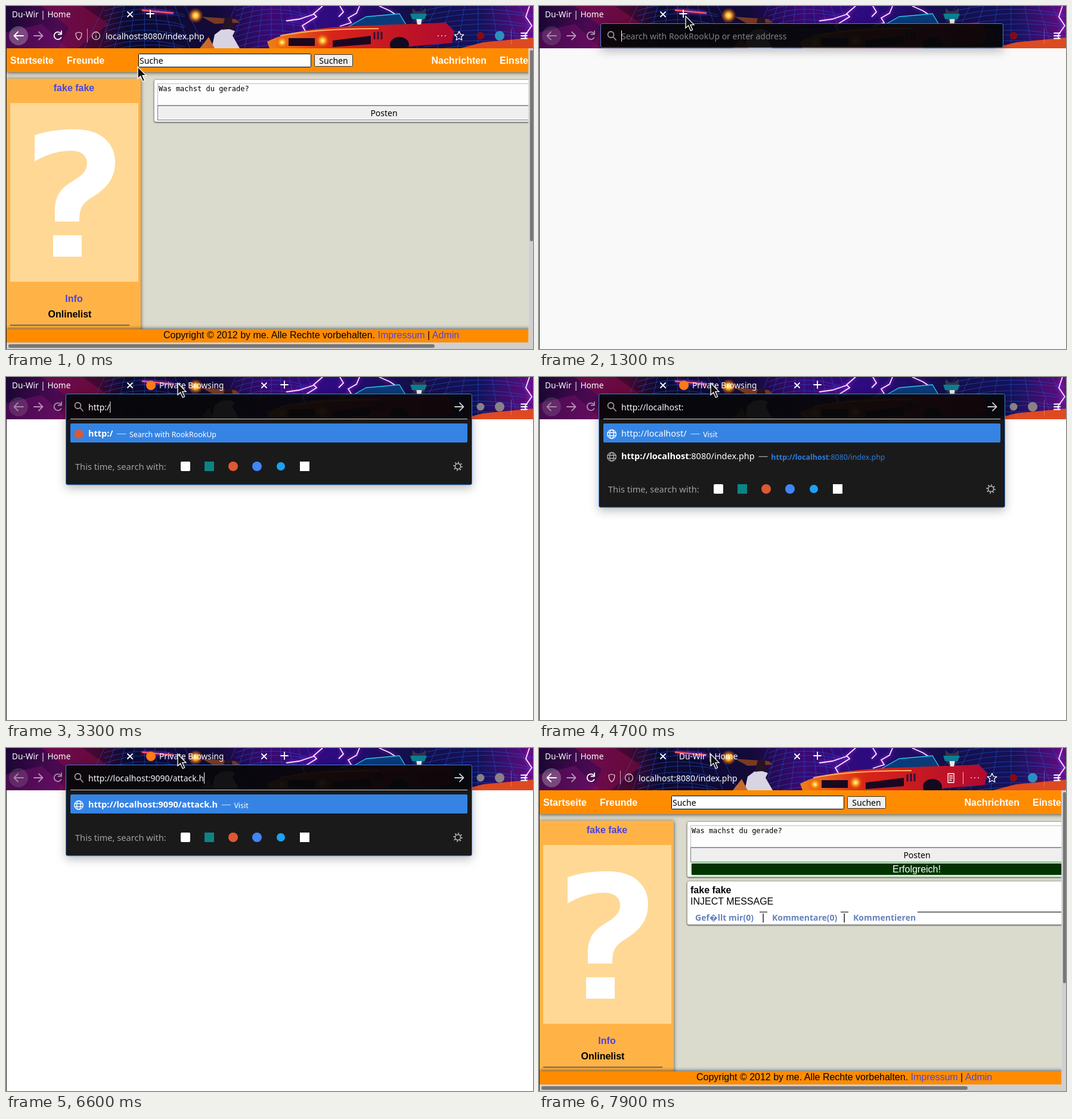
Animation, 884 px wide and 576 px high, one loop 8000 ms. Source, as an HTML page:

```html
<!DOCTYPE html>
<html lang="de">
<head>
<meta charset="utf-8">
<title>Browser demo</title>
<style>
html, body { margin: 0; width: 100%; height: 100%; overflow: hidden; background: #fff; }
svg { display: block; width: 100vw; height: 100vh; }
text { font: 14px "Noto Sans", "Open Sans", sans-serif; }
.site { font: 16px "Liberation Sans", Arial, sans-serif; }
.b { font-weight: 700; }
.mono { font: 12px "DejaVu Sans Mono", monospace; }
.tab { font-size: 13.7px; fill: #fbfbfe; }
.row { font-size: 14.5px; fill: #fff; }
.dash { font-size: 16.5px; font-weight: 400; opacity: .6; }
.sub { font-size: 12.4px; font-weight: 400; }
.link { fill: #4b44e0; }
.act { fill: #6482bd; font-weight: 700; }
.mid { text-anchor: middle; }
.line { fill: none; stroke: #fff; stroke-width: 1.8; stroke-linecap: round; stroke-linejoin: round; }
.thin { stroke-width: 1.3; }
.shade { filter: drop-shadow(0 1px 3px rgba(0,0,0,.65)); }
.card { fill: #fff; stroke: #aaa; filter: drop-shadow(0 1px 1px rgba(0,0,0,.6)); }
.field { fill: #fdfdfd; stroke: #bbb; }
.btn { fill: #efefef; stroke: #777; }
.glow { filter: drop-shadow(0 0 3px #d028ff); }
#box { stroke: #3584e4; filter: drop-shadow(0 5px 8px rgba(0,0,0,.28)); }
</style>
</head>
<body>
<svg viewBox="0 0 884 576" preserveAspectRatio="none">
<defs>
  <linearGradient id="sky">
    <stop offset="0" stop-color="#1b0634"/><stop offset=".1" stop-color="#4c0a52"/>
    <stop offset=".17" stop-color="#43082f"/><stop offset=".23" stop-color="#0b0a30"/>
    <stop offset=".4" stop-color="#130a38"/><stop offset=".5" stop-color="#3b0a72"/>
    <stop offset=".62" stop-color="#2c0b80"/><stop offset=".77" stop-color="#130f48"/>
    <stop offset=".9" stop-color="#15125a"/><stop offset="1" stop-color="#650c80"/>
  </linearGradient>
  <linearGradient id="paint">
    <stop offset="0" stop-color="#f08018"/><stop offset=".35" stop-color="#d82418"/>
    <stop offset="1" stop-color="#b00a30"/>
  </linearGradient>
  <radialGradient id="flash">
    <stop offset="0" stop-color="#fffbd0"/><stop offset=".35" stop-color="#ffb020"/>
    <stop offset="1" stop-color="#e04000" stop-opacity="0"/>
  </radialGradient>
  <clipPath id="strip"><rect width="884" height="71"/></clipPath>
  <clipPath id="view"><rect y="71" width="876.5" height="494"/></clipPath>
  <g id="globe" class="line thin">
    <circle r="7.3"/><ellipse rx="3.4" ry="7.3"/><path d="M-7 -2.5H7M-7 2.5H7"/>
  </g>
</defs>

<rect id="blank" y="71" width="884" height="505"/>

<g id="page">
  <g clip-path="url(#view)">
    <rect y="71" width="884" height="505" fill="#dadacd"/>
    <rect class="shade" x="1" y="122" width="225" height="430" fill="#ffb347"/>
    <rect x="7" y="163" width="215" height="300" fill="#ffd896"/>
    <path fill="#fff" d="M48 217C72 209 94 207 116 207C160 207 183 231 183 262C183 290 168 306 148 319C128 331 123 338 123 362H82V345C82 318 92 306 112 294C128 284 136 277 136 264C136 250 125 243 108 243C88 243 67 250 48 261ZM79 385H127V421H79Z"/>
    <text class="site b link mid" x="114" y="143">fake fake</text>
    <text class="site b link mid" x="114" y="497">Info</text>
    <text class="site b mid" x="107" y="523">Onlinelist</text>
    <path d="M7 536H207" stroke="#555" stroke-width="1.5"/>

    <rect id="postCard" class="card" x="248.5" y="123.5" width="780" height="71" rx="3"/>
    <rect class="field" x="254.5" y="130.5" width="760" height="36"/>
    <text class="mono" x="256" y="143">Was machst du gerade?</text>
    <rect class="btn" x="254.5" y="167.5" width="760" height="24"/>
    <text class="mid" x="634" y="185">Posten</text>

    <g id="posted">
      <rect x="256" y="194" width="760" height="19" fill="#030" style="filter:drop-shadow(0 0 2px #3d3)"/>
      <text class="site mid" x="633.5" y="209" fill="#fff">Erfolgreich!</text>
      <rect class="card" x="248.5" y="223.5" width="780" height="73" rx="3"/>
      <text class="site b" x="254" y="244">fake fake</text>
      <text class="site" x="254" y="263">INJECT MESSAGE</text>
      <path d="M370 275.5H383M506 275.5H519M635 275.5H884" stroke="#444" stroke-width="1.5"/>
      <text class="act" x="262" y="290">Gef&#xfffd;llt mir(0)</text>
      <text class="act" x="391" y="290">Kommentare(0)</text>
      <text class="act" x="527" y="290">Kommentieren</text>
      <text class="site" x="374" y="290">|</text><text class="site" x="510" y="290">|</text>
    </g>

    <rect class="shade" x="1" y="71" width="890" height="40" fill="#ff8c00"/>
    <g class="site b" fill="#fff">
      <text class="site b" x="7" y="97">Startseite</text><text class="site b" x="102" y="97">Freunde</text>
      <text class="site b" x="713.5" y="97">Nachrichten</text><text class="site b" x="828" y="97">Einstellungen</text>
    </g>
    <rect x="222.5" y="80.5" width="289" height="22" rx="1" fill="#fff" stroke="#000"/>
    <text x="224" y="97">Suche</text>
    <rect x="517.5" y="81.5" width="64" height="20" rx="1" fill="#efefef" stroke="#333"/>
    <text class="mid" x="549.5" y="97">Suchen</text>

    <rect x="1" y="543" width="890" height="30" fill="#ff8c00" style="filter:drop-shadow(0 -1px 3px rgba(0,0,0,.6))"/>
    <text class="site" x="264" y="558">Copyright © 2012 by me. Alle Rechte vorbehalten. <tspan class="link">Impressum</tspan> | <tspan class="link">Admin</tspan></text>
  </g>
  <path d="M876.5 71H884V576H0V565H876.5Z" fill="#cfcfcf"/>
  <rect x="879" y="74" width="5" height="321" rx="2.5" fill="#777"/>
  <rect x="4" y="568" width="715" height="6" rx="3" fill="#777"/>
</g>
<rect y="71" width="1" height="505" fill="#222"/>

<g clip-path="url(#strip)">
  <rect width="884" height="71" fill="url(#sky)"/>
  <path d="M60 0H128L172 30L120 71H88L105 36Z" fill="#8c0c48" opacity=".5"/>
  <path d="M0 71V44L60 30L104 71Z" fill="#7a1070" opacity=".45"/>
  <g id="mesh" fill="none" stroke="#2458d8" stroke-width=".9"/>
  <path d="M228 7L281 12" stroke="#ff5a60" stroke-width="2.5" class="glow"/>
  <circle cx="318" cy="16" r="13" fill="url(#flash)"/>
  <path d="M328 18L385 22L392 28L350 30Z" fill="#7a3a22"/>
  <path d="M345 71L350 48L366 36L384 42L380 50L392 71Z" fill="#d8d4e4"/>
  <path d="M362 40L367 20L378 18L382 38Z" fill="#251426"/>
  <path d="M325 71L340 52L350 71Z" fill="#c86a30"/>
  <g class="glow" fill="none" stroke="#f6e6ff" stroke-width="1.8">
    <path d="M531 0L516 13L521 18L497 33L502 42L478 58M516 14L492 22L470 25"/>
    <path d="M593 0L588 12L574 20L579 28L560 34M560 0L566 10L558 18"/>
    <path d="M626 0L644 8L656 16L650 28M878 0L872 18L882 33L870 50L880 71"/>
  </g>
  <path d="M572 36L604 18L660 13L672 33Z" fill="#0b3a78" stroke="#28c8f0" stroke-width="1.3"/>
  <path d="M438 60C470 42 540 35 600 33L738 28L752 42L748 62L640 71H442Z" fill="url(#paint)"/>
  <path d="M460 50C510 40 570 38 625 38" stroke="#ffb060" fill="none" stroke-width="2"/>
  <path d="M474 54H518V67H474ZM548 58L612 50V64L548 69Z" fill="#1a0820"/>
  <path d="M618 44V56M624 43V56M630 43V56" stroke="#30103a" stroke-width="3"/>
  <ellipse cx="660" cy="65" rx="16" ry="13" fill="#120a20"/>
  <circle cx="463" cy="61" r="11" fill="url(#flash)"/><circle cx="531" cy="58" r="12" fill="url(#flash)"/>
  <path d="M682 3L688 9H697L704 3V20L698 29H688L681 20Z" fill="#38304c"/>
  <path d="M688 20H698L696 31H690Z" fill="#e8e4ee"/>
  <path d="M678 13H706L702 22H681Z" fill="#0b7f92"/>
  <path d="M762 71L800 61L884 53V71Z" fill="#dd4a22"/>
</g>

<text class="tab" x="10" y="19">Du-Wir | Home</text>
<path class="line" d="M204 10L212 18M212 10L204 18"/>
<g id="tab2">
  <circle id="favicon" cx="243" cy="14" r="8" fill="#ff7a1a"/>
  <text id="title2" class="tab" y="19"></text>
  <path class="line" d="M429 10L437 18M437 10L429 18"/>
</g>
<path id="plus" class="line" d="M-6 13H6M0 7V19"/>

<g id="nav">
  <circle cx="21" cy="50" r="16" fill="#fff" opacity=".25"/>
  <path class="line" d="M29 50H14M20 43.5L13.5 50L20 56.5"/>
</g>
<path class="line" d="M47 50H61M55 43.5L61.5 50L55 56.5" opacity=".55"/>
<path id="reload" class="line" d="M92 46A6.3 6.3 0 1 0 92.5 53M93 42V47.5H87.5"/>
<path d="M847.5 38V64" stroke="#fff" opacity=".25"/>
<path class="line" d="M864 45.5H874M864 50H874M864 54.5H874" stroke-width="2"/>
<circle id="ext1" cx="796" cy="50" r="6.5"/>
<circle id="ext2" cx="828" cy="50" r="8"/>

<g id="address">
  <path class="line thin" d="M122 44L127 45.5C127 51 126 54 122 57C118 54 117 51 117 45.5Z" opacity=".8"/>
  <path d="M136.5 38V61" stroke="#fff" opacity=".6"/>
  <g class="line thin" opacity=".8"><circle cx="151" cy="50" r="6.5"/><path d="M151 49.5V53.5M151 46.5V46.6"/></g>
  <text id="url" x="167" y="56" fill="#fbfbfe"></text>
  <g id="reader"><path class="line thin" d="M686 43H696V58H686ZM688.5 47H693.5M688.5 50.5H693.5M688.5 54H692"/>
    <path d="M711.5 40V61" stroke="#fff" opacity=".7"/></g>
  <path class="line" stroke-width="3" d="M725 50h.1M731 50h.1M737 50h.1" opacity=".85"/>
  <path class="line thin" d="M760 42.5L762.3 47.6L767.8 48.2L763.7 51.8L764.9 57.3L760 54.5L755.1 57.3L756.3 51.8L752.2 48.2L757.7 47.6Z"/>
</g>

<g id="panel">
  <rect id="box" rx="3" fill="#08080a" fill-opacity=".93"/>
  <g class="line" stroke="#999" style="stroke:#999"><circle cx="120.5" cy="48" r="5"/><path d="M124.5 52L129 57"/></g>
  <text id="hint" x="138" y="56" fill="#838383">Search with RookRookUp or enter address</text>
  <rect id="selection" y="41" height="20" fill="#3584e4"/>
  <text id="input" x="138" y="56" fill="#fbfbfe"></text>
  <rect id="caret" y="41" width="1" height="19" fill="#fff"/>
  <g id="results">
    <rect id="drop" x="101.5" y="71" width="679" fill="#1a1a1b"/>
    <path d="M108 70.5H774" stroke="#d5d5d8"/>
    <path class="line" d="M753 50H767M761 43.5L767.5 50L761 56.5" style="stroke:#ccc"/>
    <rect x="108" y="78" width="666" height="32" rx="2" fill="#3584e4"/>
    <circle id="engine" cx="122" cy="96" r="7.5" fill="#de5833"/>
    <use id="globe1" href="#globe" x="122" y="96"/>
    <text class="row" x="138" y="100"><tspan id="head1"></tspan><tspan class="dash" dx="6">—</tspan><tspan id="sub1" class="sub" dx="5" dy="1"></tspan></text>
    <g id="row2">
      <use href="#globe" x="122" y="134" opacity=".65"/>
      <text class="row" x="138" y="138"><tspan id="match" class="b"></tspan><tspan id="rest"></tspan><tspan class="dash" dx="6">—</tspan><tspan id="matchSub" class="sub b" dx="5" dy="1" fill="#2a7de0" style="font-weight:700"></tspan><tspan id="restSub" class="sub" fill="#2a7de0"></tspan></text>
    </g>
    <g id="engines">
      <text x="116" y="156" fill="#a0a0a2" style="font-size:14.6px">This time, search with:</text>
      <rect x="293" y="142" width="16" height="16" rx="2" fill="#fff"/>
      <rect x="333" y="142" width="16" height="16" fill="#0c8484"/>
      <circle cx="381" cy="150" r="8" fill="#de5833"/>
      <circle cx="421" cy="150" r="8" fill="#4285f4"/>
      <circle cx="461" cy="150" r="7" fill="#1da1f2"/>
      <rect x="493" y="142" width="16" height="16" fill="#fff"/>
      <g fill="none" stroke="#b8b8ba"><circle cx="758" cy="150" r="4.6" stroke-width="1.6"/>
        <circle cx="758" cy="150" r="6.6" stroke-width="2.4" stroke-dasharray="1.8 3.384"/></g>
    </g>
  </g>
</g>

<path id="cursor" d="M0 0V20L4.6 15.8L8.4 24.5L11.6 23L7.9 14.6H14Z" fill="#111" stroke="#fff" stroke-width="1.3"/>
</svg>

<script>
const LOOP = 8000, STEP = 100;
const OPEN = 1300, ENTER = 7400, LOADED = 7700;
const HOST = 'http://localhost/', VISITED = 'http://localhost:8080/index.php';

const $ = id => document.getElementById(id);
const show = (id, on) => $(id).style.display = on ? '' : 'none';
const set = (id, attrs) => { for (const k in attrs) $(id).setAttribute(k, attrs[k]); };
const text = (id, value) => $(id).textContent = value;
const clamp = v => Math.max(0, Math.min(1, v));

// Bursts of keystrokes: start, interval, keys
const bursts = [
  [2300, 200, [...'http://']], [3700, 100, [...'localhost']], [4700, 100, [':']],
  [5000, 100, [...'9090/']], [5600, 100, [...'attack']],
  [6600, 100, ['.h', 't', 'm']], [7000, 100, ['l']]
];
const typedAt = t => bursts.map(([start, gap, keys]) =>
  keys.filter((_, i) => t >= start + i * gap).join('')).join('');

// Pointer moves: start, end, from, to
const moves = [[300, 1000, [221, 102], [246, 17]], [1300, 1700, [246, 17], [288, 10]]];
function pointer(t) {
  const [start, end, a, b] = moves[t < OPEN ? 0 : 1];
  const p = clamp((t - start) / (end - start));
  return a.map((v, i) => v + (b[i] - v) * p);
}

function drawMesh() {
  let d = '';
  for (const [x, w] of [[165, 135], [385, 120], [700, 184]]) {
    for (let i = 0; i < 9; i++) {
      const u = i / 8;
      d += `M${x + w * u} 0L${x + w * (1.5 * u - .25)} 71`;
      d += `M${x} ${8 + 70 * u}Q${x + w / 2} ${70 * u - 14} ${x + w} ${9 * i + 6 * (i % 2)}`;
    }
  }
  $('mesh').innerHTML = `<path d="${d}" opacity=".6"/>`;
}

function drawPanel(t) {
  const typed = typedAt(t), grown = t > OPEN;
  const twoRows = t >= 3700 && t < 5000, filled = t >= 3700 && t < 4700;
  const bottom = typed ? (twoRows ? 219 : 181) : grown ? 72 : 70;
  const left = grown ? 100.5 : 103.5, top = grown ? 28.5 : 29.5;
  set('box', { x: left, y: top, width: 2 * (441 - left), height: bottom - top });
  show('hint', !typed);
  show('results', typed);

  text('input', typed);
  const end = 138 + (typed ? $('input').getComputedTextLength() : 0);
  let stop = end;
  if (filled) {
    text('input', HOST);
    stop = 138 + $('input').getComputedTextLength();
  }
  set('selection', { x: end, width: stop - end });
  set('caret', { x: end });
  show('caret', !filled && ![2300, 4700, 7000, 7100].includes(t));
  if (!typed) return;

  const searching = t < 3700, stale = t >= 3700 && t < 4800;
  show('engine', searching);
  show('globe1', !searching);
  text('head1', stale ? HOST : typed);
  set('head1', { class: stale ? '' : 'b' });
  text('sub1', searching ? 'Search with RookRookUp' : 'Visit');
  show('row2', twoRows);
  const n = stale ? Math.min(typed.length, HOST.length - 1) : typed.length;
  for (const s of ['', 'Sub']) {
    text('match' + s, VISITED.slice(0, n));
    text('rest' + s, VISITED.slice(n));
  }
  set('drop', { height: bottom - 72 });
  set('engines', { transform: `translate(0 ${twoRows ? 38 : 0})` });
}

function render(t) {
  const fresh = t >= OPEN && t < ENTER, loaded = t >= LOADED;
  const onPage = t < OPEN || loaded;
  show('page', onPage);
  show('posted', loaded);
  set('postCard', { height: loaded ? 93 : 71 });
  set('blank', { fill: t < 1500 ? '#f9f9fa' : '#fff' });

  show('tab2', t >= 1500);
  show('favicon', fresh);
  text('title2', fresh ? 'Private Browsing' : loaded ? 'Du-Wir | Home' : 'localhost:9090/attack.html');
  set('title2', { x: fresh ? 257 : 235 });
  set('plus', { transform: `translate(${242 + 225 * clamp((t - OPEN) / 200)} 0)` });

  set('nav', { opacity: fresh ? .5 : 1 });
  set('reload', { opacity: fresh ? .55 : 1 });
  set('ext1', { fill: fresh && t > OPEN ? '#8a8088' : '#800c18' });
  set('ext2', { fill: fresh ? '#8a8088' : '#2b8fc0' });
  show('ext2', t !== OPEN);

  show('address', !fresh);
  show('reader', loaded);
  text('url', onPage ? 'localhost:8080/index.php' : 'localhost:9090/attack.html');
  show('panel', fresh);
  if (fresh) drawPanel(t);
  set('cursor', { transform: `translate(${pointer(t)})` });
}

drawMesh();
let last = -1;
const origin = performance.now();
function tick() {
  const t = Math.floor((performance.now() - origin) % LOOP / STEP) * STEP;
  if (t !== last) render(last = t);
  requestAnimationFrame(tick);
}
tick();
</script>
</body>
</html>
```
